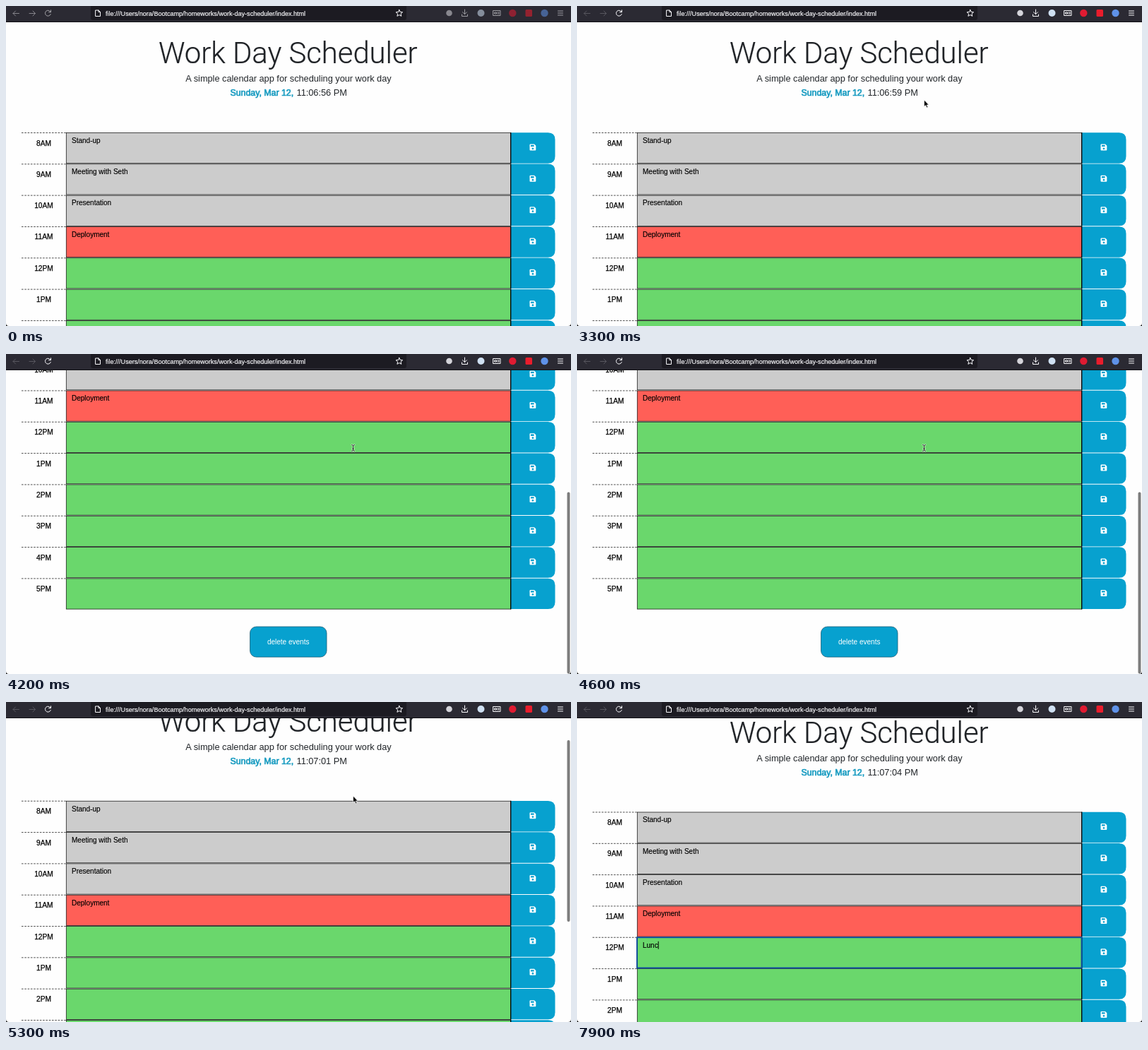
Recreate the animation shown at these times as an HTML page. Size 800 by 453 pixels, loop 8000 ms.

```html
<!DOCTYPE html>
<html lang="en">
<head>
<meta charset="utf-8">
<title>Work Day Scheduler</title>
<style>
  html, body { margin: 0; width: 100%; height: 100%; overflow: hidden; background: #fff; }
  svg { display: block; width: 800px; height: 453px; }
  text { font: 10px "Liberation Sans", Arial, sans-serif; white-space: pre; }
  .title { font: 300 41.8px Roboto, "Liberation Sans", sans-serif; fill: #1f2226; stroke: #1f2226; stroke-width: .2; }
  .lead { font-size: 12.75px; fill: #212529; }
  .date { font-size: 12.35px; fill: #1a9cc1; stroke: #1a9cc1; stroke-width: .7; }
  .hour { font-size: 10.2px; stroke: #000; stroke-width: .25; }
  .note { stroke: #000; stroke-width: .15; }
  .url { font-size: 9.05px; fill: #f6f6f9; stroke: #f6f6f9; stroke-width: .2; }
  .mid { text-anchor: middle; }
  .line { fill: none; stroke: #fbfbfe; stroke-width: 1; stroke-linecap: round; stroke-linejoin: round; }
  .nav .line { stroke: #57565e; }
  .idle .nav .line { stroke: #85848b; }
  .idle .tools { opacity: .55; }
</style>
</head>
<body>
<svg viewBox="0 0 800 453">
  <defs>
    <path id="ibeam" d="M-2-4.500Q0-4.500 0-3V3Q0 4.500-2 4.500M2-4.500Q0-4.500 0-3M0 3Q0 4.500 2 4.500M-1.200 1H1.200"/>
  </defs>
  <rect width="800" height="453" fill="#fefefe"/>
  <g id="page">
    <text class="title mid" x="399.3" y="81">Work Day Scheduler</text>
    <text class="lead mid" x="400" y="107">A simple calendar app for scheduling your work day</text>
    <text class="date" x="317.5" y="127">Sunday, Mar 12,</text>
    <text class="lead" id="clock" x="411.5" y="127"></text>
    <g id="rows"></g>
    <rect x="345.5" y="646.5" width="108.5" height="43" rx="9" fill="#07a1cf" stroke="#1d5f78" stroke-width=".8"/>
    <text class="mid" x="399.7" y="671" fill="#fff">delete events</text>
  </g>
  <rect id="thumb" x="794.5" width="4" height="257" rx="2" fill="#7d7d7d"/>

  <g id="bar">
    <rect width="800" height="23" fill="#2b2a33"/>
    <rect y="22" width="800" height="1" fill="#0f0f13"/>
    <path d="M120 0H567V17q0 3-3 3H123q-3 0-3-3z" fill="#1c1b22"/>
    <g class="nav">
      <path class="line" d="M18.500 10.500H10m3.500-3.500L10 10.500 13.500 14"/>
      <path class="line" d="M33 10.500H41.500M38 7l3.500 3.500L38 14"/>
    </g>
    <path class="line" d="M127 6h4l2.500 2.500V14.500H127zM131 6v2.500h2.500"/>
    <text class="url" x="141" y="13.500">file:///Users/nora/Bootcamp/homeworks/work-day-scheduler/index.html</text>
    <path class="line" id="star"/>
    <g class="tools">
      <path class="line" d="M63 8.200A4 4 0 1 0 63.300 11.500M63.500 5.800V8.700H60.600"/>
      <circle cx="627.500" cy="10" r="4.300" fill="#d4d4da"/>
      <path class="line" d="M649.500 5v6.500m-3-2.800 3 3 3-3M645.500 12v2.500h8V12"/>
      <circle cx="672.500" cy="10" r="5" fill="#cfe0f2"/>
      <path class="line" d="M690 6.500h10v7H690zM692 9h2.500v2H692zM696 9h2.500M696 11h2.500"/>
      <circle cx="717.300" cy="10" r="5.200" fill="#e01b32"/>
      <rect x="735.500" y="5" width="9.500" height="10" rx="1.500" fill="#ea1d2c"/>
      <circle cx="762.500" cy="10" r="5.200" fill="#5f92e8"/>
      <path class="line" d="M781.500 7h7M781.500 10h7M781.500 13h7"/>
    </g>
  </g>
  <path d="M0 449v4h4q-4 0-4-4zM800 449v4h-4q4 0 4-4z" fill="#111"/>

  <path id="arrow" d="M0 0V9.500L2.200 7.600 3.700 11 5.300 10.300 3.800 7H6.700z" fill="#000" stroke="#fff" stroke-width=".7"/>
  <g id="beam" fill="none" stroke-linecap="round">
    <use href="#ibeam" stroke="#fff" stroke-width="2" opacity=".75"/>
    <use href="#ibeam" stroke="#111" stroke-width=".8"/>
  </g>
</svg>
<script>
const LOOP = 8000, STEP = 100;
const ROW_TOP = 179.5, PITCH = 44.32, LUNCH = 4;
const ACTIVE_AT = 3000, FOCUS_AT = 6700, TYPE_AT = 7400;
const $ = id => document.getElementById(id);

const hours = ['8AM', '9AM', '10AM', '11AM', '12PM', '1PM', '2PM', '3PM', '4PM', '5PM'];
const events = ['Stand-up', 'Meeting with Seth', 'Presentation', 'Deployment'];
const color = i => i < 3 ? '#ccc' : i === 3 ? '#ff5f57' : '#6ad76c';

const rowTop = i => ROW_TOP + i * PITCH;
$('rows').innerHTML = hours.map((hour, i) => `
  <g transform="translate(0 ${rowTop(i)})">
    <path d="M22 0H85" stroke="#222" stroke-width=".8" stroke-dasharray="2.6 1.7"/>
    <text class="hour mid" x="53.500" y="18">${hour}</text>
    <path d="M715-.2H767.500q10 0 10 10V33.200q0 10-10 10H715z" fill="#07a1cf"/>
    <rect x="85.300" y="0" width="629.200" height="43.200" fill="${color(i)}" stroke="#111" stroke-width=".75"/>
    <path d="M714.700-.4V43.600" stroke="#000" stroke-width="1.300"/>
    <text class="note" x="93" y="14.300">${events[i] || ''}</text>
    <path fill="#fff" fill-rule="evenodd" d="M742.500 16h5.500l2.300 2.300V24q0 1-1 1h-6.800q-1 0-1-1V17q0-1 1-1z
      M743 17.300v2.300h4.600v-2.300zM745.900 21a1.400 1.400 0 1 0 .01 0z"/>
  </g>`).join('') + `
  <g id="focus" transform="translate(0 ${rowTop(LUNCH)})">
    <rect x="85" y="0" width="629.500" height="43.200" fill="none" stroke="#0c4aa0" stroke-width="1.800"/>
    <text class="note" id="typed" x="93" y="14.300"></text>
    <rect id="caret" y="5.500" width="1" height="11" fill="#000"/>
  </g>`;

const starPoint = k => {
  const r = k % 2 ? 2.3 : 5, a = k * Math.PI / 5;
  return `${556.8 + r * Math.sin(a)} ${10.3 - r * Math.cos(a)}`;
};
$('star').setAttribute('d', 'M' + Array.from({ length: 10 }, (_, k) => starPoint(k)).join('L') + 'Z');

// Each step is [time, ...values]; values run linearly between steps.
const scrollSteps = [[3300, 0], [3500, 42], [3700, 127], [3900, 214], [4100, 256], [4200, 260.5],
  [4700, 260.5], [4800, 228], [5000, 131.5], [5200, 55], [5400, 23.5]];
const pointerSteps = [[100, 530, 442], [500, 486, 290], [900, 450, 175], [1300, 436, 137],
  [2400, 436, 137], [2800, 491.5, 133], [5600, 491.5, 133], [5800, 360, 215], [6000, 185, 330], [6200, 124, 361]];
const typing = [[TYPE_AT, 'L'], [7600, 'Lu'], [7700, 'Lun'], [7900, 'Lunc']];

function at(steps, t) {
  const next = steps.findIndex(s => s[0] > t);
  if (next === 0) return steps[0].slice(1);
  if (next < 0) return steps[steps.length - 1].slice(1);
  const a = steps[next - 1], b = steps[next], p = (t - a[0]) / (b[0] - a[0]);
  return a.slice(1).map((v, i) => v + (b[i + 1] - v) * p);
}

const show = (id, on) => $(id).setAttribute('visibility', on ? 'visible' : 'hidden');
const move = (id, x, y) => $(id).setAttribute('transform', `translate(${x} ${y})`);

function clockText(t) {
  const s = 6 * 60 + 56 + Math.floor((t + 400) / 1000);
  const pad = n => String(n).padStart(2, '0');
  return `11:${pad(Math.floor(s / 60))}:${pad(s % 60)} PM`;
}

function draw(t) {
  const [scroll] = at(scrollSteps, t), [x, y] = at(pointerSteps, t);
  move('page', 0, -scroll);
  $('clock').textContent = clockText(t);
  $('thumb').setAttribute('y', 29 + scroll * .639);
  show('thumb', t >= 3400 && t < 6900);
  $('bar').setAttribute('class', t < ACTIVE_AT ? 'idle' : '');

  const visible = t >= 100 && t < TYPE_AT;
  const overField = t >= ACTIVE_AT && x > 85 && x < 715 && y > ROW_TOP - scroll;
  show('arrow', visible && !overField);
  show('beam', visible && overField);
  move('arrow', x, y);
  move('beam', x, y);

  show('focus', t >= FOCUS_AT);
  const typed = typing.filter(s => s[0] <= t).pop();
  $('typed').textContent = typed ? typed[1] : '';
  $('caret').setAttribute('x', 93 + (typed ? $('typed').getComputedTextLength() : 0));
}

const start = performance.now();
function tick() {
  const t = (performance.now() - start) % LOOP;
  draw(Math.floor(t / STEP) * STEP);
  requestAnimationFrame(tick);
}
tick();
</script>
</body>
</html>
```
